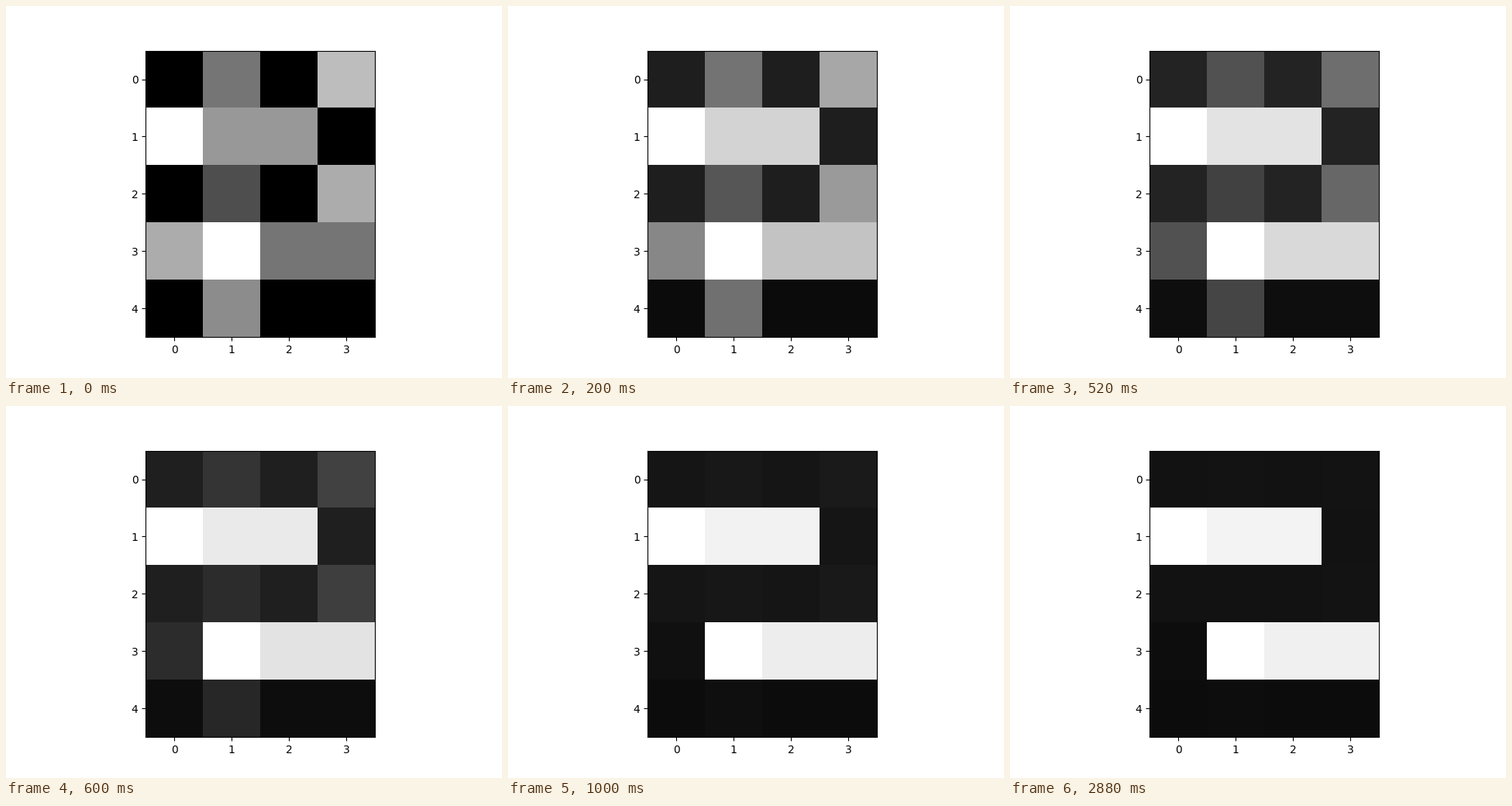
Write a matplotlib script that moves like this. It is 640 by 480 pixels and loops after 4000 ms.

```python
import numpy as np
import matplotlib.pyplot as plt
from matplotlib.animation import FuncAnimation

STEP_MS = 200
FRAMES = 20
LAST_STEP = 6

START = np.array([
    [0, 117, 0, 189],
    [255, 152, 152, 0],
    [0, 78, 0, 172],
    [172, 255, 117, 117],
    [0, 140, 0, 0],
])
row, col = np.indices(START.shape)

# The two bars that stay lit; all other cells fade out
BRIGHT = (row == 1) & (col < 3) | (row == 3) & (col > 0)
GLOW = np.where(row < 3, 52, 18)


def levels(t):
    """Grey levels after t steps."""
    lit = 255 - (255 - START) / (1 + 1.3 * t)
    fade = START * np.exp(-(t / 2.1) ** 1.5)
    dark = fade + GLOW * t * np.exp(-t / 1.7) + 1.5 * t
    return np.where(BRIGHT, lit, dark)


fig, ax = plt.subplots(figsize=(6.4, 4.8), dpi=100)
image = ax.imshow(levels(0), cmap="gray", vmin=0, vmax=255)


def update(i):
    image.set_data(levels(min(i, LAST_STEP)))
    return [image]


anim = FuncAnimation(fig, update, frames=FRAMES, interval=STEP_MS,
                     repeat=True, repeat_delay=0, blit=False)
plt.show()
```
